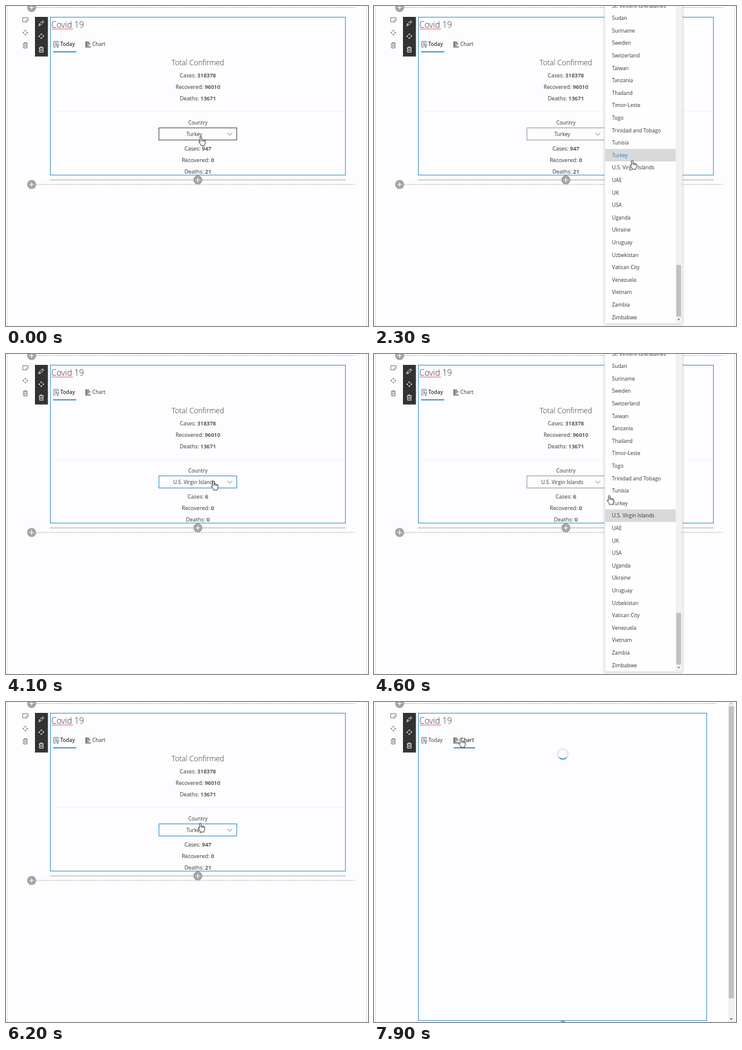
Recreate the animation shown at these times as an HTML page. Size 600x529 px, loop 8000 ms.

```html
<!DOCTYPE html>
<html lang="en">
<head>
<meta charset="utf-8">
<title>Covid 19 web part</title>
<style>
html, body { margin: 0; width: 100%; height: 100%; overflow: hidden; background: #fdfcfe; }
svg { display: block; width: 600px; height: 529px; font: 8.5px "Open Sans", "Noto Sans", sans-serif; fill: #333; }
b, .b { font-weight: 600; }
.mid { text-anchor: middle; }
.stat { font-size: 9px; }
.light { font-weight: 300; }
.line { fill: none; stroke: #a8a8a8; }
.dash { stroke-dasharray: 2.2 1.4; }
.icon { fill: none; stroke: #666; stroke-width: .9; }
.bar .icon { stroke: #fff; }
.part { fill: none; stroke: #2e93c4; }
.tab { stroke: #1a73b8; stroke-width: 1.6; }

.today, .chart, .home, .away, .hand, .arrow, .box, .row, .turkey, .islands {
  animation: 8s step-end infinite;
}
.today { animation-name: today; }
.chart { animation-name: chart; }
.home { animation-name: home; }
.away { animation-name: away; }
.hand { animation-name: hand; }
.arrow { animation-name: arrow; }
.box { animation-name: box; }
.row { animation-name: row; }
.turkey { animation-name: turkey; }
.islands { animation-name: islands; }
.panel { animation: panel 8s ease-out infinite; }
.cursor { animation: move 8s ease-in-out infinite; }
.spin { animation: spin 8s linear infinite; }

@keyframes today { 0% { opacity: 1 } 91.2%, 100% { opacity: 0 } }
@keyframes chart { 0% { opacity: 0 } 91.2%, 100% { opacity: 1 } }
@keyframes home { 0%, 67.35%, 100% { opacity: 1 } 38.7% { opacity: 0 } }
@keyframes away { 0%, 67.35%, 100% { opacity: 0 } 38.7% { opacity: 1 } }
@keyframes hand { 0%, 45.6%, 74%, 83%, 100% { opacity: 1 } 38.7%, 67.35%, 78.5% { opacity: 0 } }
@keyframes arrow { 0%, 45.6%, 74%, 83%, 100% { opacity: 0 } 38.7%, 67.35%, 78.5% { opacity: 1 } }
@keyframes box {
  0%, 100% { stroke: #444 }
  13.75%, 53.7%, 87.4% { stroke: #929292 }
  38.7%, 67.35% { stroke: #2b88c8 }
}
@keyframes row { 0%, 100% { transform: none } 45% { transform: translateY(20.6px) } }
@keyframes turkey { 0%, 32.4%, 67.5%, 100% { fill: #333 } 26%, 64.9% { fill: #1a80cc } }
@keyframes islands { 0%, 40%, 100% { fill: #333 } 34.9% { fill: #1a80cc } }
@keyframes panel {
  0%, 3.6%, 38.7%, 53.7%, 67.35%, 100% { opacity: 0; transform: translateY(-8px) }
  5.6%, 38.65%, 55.7%, 67.3% { opacity: 1; transform: none }
}
@keyframes move {
  0%, 6.25% { transform: translate(323px, 216px) }
  11.25%, 15% { transform: translate(395px, 222px) }
  26.25%, 28.75% { transform: translate(428px, 255px) }
  32.5%, 40% { transform: translate(430px, 264px) }
  48.75%, 55% { transform: translate(344px, 210px) }
  60% { transform: translate(435px, 257px) }
  62.5%, 68.1% { transform: translate(421px, 250px) }
  77.5% { transform: translate(322px, 200px) }
  83.75%, 100% { transform: translate(144px, 60px) }
}
@keyframes spin {
  0%, 91.25% { transform: rotate(0deg); animation-timing-function: cubic-bezier(.5, .25, .7, .7) }
  98.75% { transform: rotate(180deg) }
  100% { transform: rotate(220deg) }
}
</style>
</head>
<body>
<svg viewBox="0 0 600 529">
  <defs>
    <g id="plus">
      <circle r="7.5" fill="#a3a3a3"/>
      <path d="M-4 0H4M0-4V4" stroke="#fff" stroke-width="1.2"/>
    </g>
    <path id="arrows" d="M-1.3-2.9 0-4.2 1.3-2.9ZM-1.3 2.9 0 4.2 1.3 2.9ZM-2.9-1.3-4.2 0-2.9 1.3ZM2.9-1.3 4.2 0 2.9 1.3Z"/>
    <path id="bin" d="M-4-3H4M-1.4-3V-4.4H1.4V-3M-3-3V4.4H3V-3M-1.1-1.2V2.8M1.1-1.2V2.8"/>
    <path id="pencil" d="M-4.2 4.2-3.4 1.2 2.2-4.2 4.2-2.2-1.3 3.4ZM1-3 3-1M-3.4 1.2-1.3 3.4"/>
    <path id="note" d="M4.3 0V-3.6H-4.3V3.2H-.5M.2 4 .8 2 4 -.6 5 .6 2.2 3.4Z"/>
  </defs>

  <path class="line" d="M2.5 0V529" stroke-opacity=".35"/>
  <g class="icon">
    <use href="#note" x="32" y="23"/>
    <use href="#arrows" x="32" y="44"/>
    <use href="#bin" x="32" y="65"/>
  </g>
  <g class="bar">
    <path d="M48 18H69.5V83.5H48Z" fill="#323232"/>
    <g class="icon">
      <use href="#pencil" x="58.5" y="28.5"/>
      <use href="#arrows" x="58.5" y="50"/>
      <use href="#bin" x="58.5" y="72"/>
    </g>
  </g>

  <g class="today">
    <path class="line" d="M597.5 0V529" stroke-opacity=".35"/>
    <path class="line dash" d="M50 2.5H578M50 295H578"/>
    <path class="line" d="M73 287.5H563"/>
    <path d="M74 174.5H562" stroke="#f3f2f4"/>
    <rect class="part" x="73.5" y="18.5" width="489" height="261"/>
    <text class="b" x="90" y="66.3">Today</text>
    <text x="143" y="66.3">Chart</text>
    <path class="tab" d="M78 75.8H116.5"/>
    <g class="mid stat">
      <text class="light" x="318" y="97.6" font-size="12.2">Total Confirmed</text>
      <text x="318" y="117.8">Cases: <tspan class="b">318378</tspan></text>
      <text x="318" y="137">Recovered: <tspan class="b">96010</tspan></text>
      <text x="318" y="156.3">Deaths: <tspan class="b">13671</tspan></text>
      <text x="318" y="195.6" font-size="8.6">Country</text>
      <text x="318" y="258">Recovered: <tspan class="b">0</tspan></text>
    </g>
    <rect class="box" x="253.5" y="201.5" width="129" height="20" fill="none"/>
    <path d="M366.8 209.6 370.8 213.6 374.8 209.6" fill="none" stroke="#666" stroke-width=".9"/>
    <g class="home mid">
      <text x="312" y="215">Turkey</text>
      <text class="stat" x="318" y="238.8">Cases: <tspan class="b">947</tspan></text>
      <text class="stat" x="318" y="277.3">Deaths: <tspan class="b">21</tspan></text>
    </g>
    <g class="away mid">
      <text x="312" y="215">U.S. Virgin Islands</text>
      <text class="stat" x="318" y="238.8">Cases: <tspan class="b">6</tspan></text>
      <text class="stat" x="318" y="277.3">Deaths: <tspan class="b">0</tspan></text>
    </g>
    <use href="#plus" x="42.5" y="295"/>
    <use href="#plus" x="318" y="287.5"/>
  </g>

  <g class="chart">
    <path class="line dash" d="M50 2.5H567"/>
    <rect class="part" x="73.5" y="18.5" width="478" height="508"/>
    <text x="90" y="66.3">Today</text>
    <text class="b" x="143" y="66.3">Chart</text>
    <path class="tab" d="M132 75.8H167.5"/>
    <g transform="translate(313 86)" fill="none" stroke-width="1.7">
      <circle r="8.5" stroke="#c7e0f4"/>
      <path class="spin" d="M-6-6A8.5 8.5 0 0 1 6-6" stroke="#1a7fc4"/>
    </g>
    <use href="#plus" x="313" y="534.5"/>
    <path d="M587 0H598V529H587Z" fill="#f1f1f1"/>
    <path d="M588 7H596.5V490H588Z" fill="#c1c1c1"/>
    <path d="M589.8 3.5 592.2 1 594.6 3.5Z" fill="#aaa"/>
    <path d="M589.8 523 592.2 525.6 594.6 523Z" fill="#555"/>
  </g>

  <use href="#plus" x="42.5" y="2.5"/>
  <text class="light" x="75" y="35.8" font-size="14">Covid 19</text>
  <path id="wave" fill="none" stroke="#e0384a" stroke-width=".9"/>
  <path d="M86.5 62V58.5H79V68H82.5M80.8 60.8H84.8M80.8 63H84.8M80.8 65.2H83M83.2 64H88L86.2 66.2V69H85V66.2Z" fill="none" stroke="#5d6b80" stroke-width=".9"/>
  <path d="M132.5 58.5V68.5M132 60H138M132 62.6H140M132 65.2H137M132 67.6H140.5" fill="none" stroke="#444" stroke-width="1.3"/>

  <g class="panel">
    <path d="M382.5-20H511V525H382.5Z" fill="#fefefe" stroke="#e6e5e7" style="filter:drop-shadow(0 1px 2px #0003)"/>
    <path class="row" d="M383 236.3H500V256.9H383Z" fill="#d9d9d9"/>
    <path d="M500-12H510.5V524H500Z" fill="#f1f1f1"/>
    <path d="M501 428H509V513.5H501Z" fill="#c1c1c1"/>
    <path d="M503 517.3 505 519.5 507 517.3Z" fill="#555"/>
    <g id="list"></g>
  </g>

  <g class="cursor" fill="#fff" stroke="#222" stroke-width=".9" stroke-linejoin="round">
    <path class="hand" d="M-1.3 .8Q0-1 1.3 .8V5Q2.6 4.3 3.5 5.3 4.8 4.7 5.5 5.8 7 5.5 7.3 6.9V10Q7.3 12 6.1 13.4V15H0V13.6L-3.3 9Q-4-.0-1.3 8.6ZM1.3 5V7.6M3.5 5.3V7.8M5.5 5.8V8"/>
    <path class="arrow" d="M0 0V11.2L2.6 8.8 4.3 12.6 6 11.9 4.3 8.1H7.6Z"/>
  </g>
</svg>
<script>
const $ = id => document.getElementById(id);
const hand = document.querySelector('.hand');
hand.setAttribute('d', hand.getAttribute('d').replace('Q-4-.0-1.3 8.6', 'Q-3.8 7.2-2.4 7.5L-1.3 8.6'));

const countries = ['St. Vincent Grenadines', 'Sudan', 'Suriname', 'Sweden', 'Switzerland', 'Taiwan',
  'Tanzania', 'Thailand', 'Timor-Leste', 'Togo', 'Trinidad and Tobago', 'Tunisia', 'Turkey',
  'U.S. Virgin Islands', 'UAE', 'UK', 'USA', 'Uganda', 'Ukraine', 'Uruguay', 'Uzbekistan',
  'Vatican City', 'Venezuela', 'Vietnam', 'Zambia', 'Zimbabwe'];
const hover = { 'Turkey': 'turkey', 'U.S. Virgin Islands': 'islands' };

countries.forEach((name, i) => {
  const item = document.createElementNS('http://www.w3.org/2000/svg', 'text');
  item.setAttribute('x', 394.5);
  item.setAttribute('y', 2.6 + i * 20.6);
  if (hover[name]) item.setAttribute('class', hover[name]);
  item.textContent = name;
  $('list').append(item);
});

$('wave').setAttribute('d', 'M75 38.8' + 'l1.5-1.4 1.5 1.4'.repeat(12));
</script>
</body>
</html>
```
